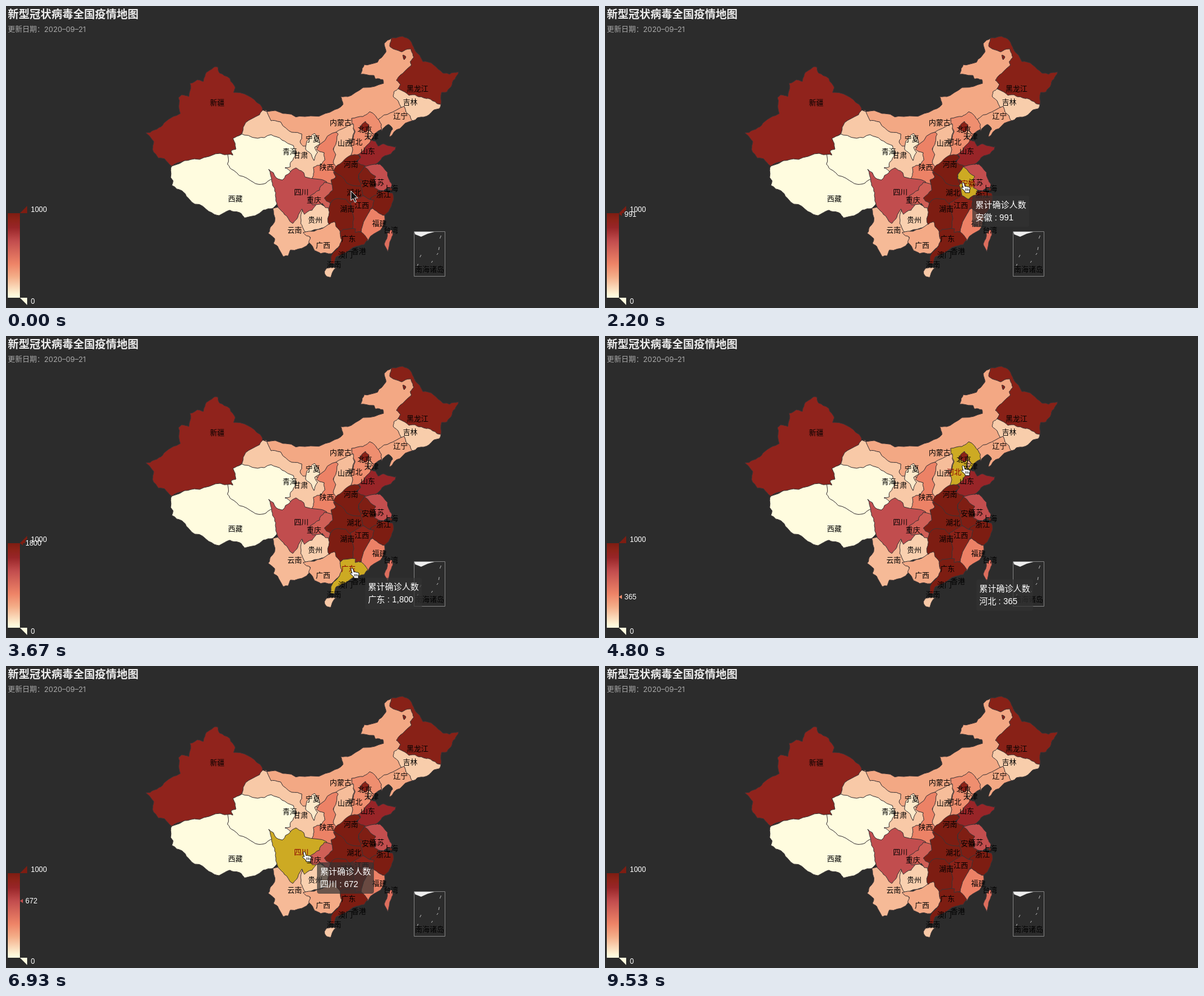
An HTML page that plays this animation: 980x500 px, repeating every 9.59 s.

```html
<!DOCTYPE html>
<html lang="zh-CN">
<head>
<meta charset="utf-8">
<title>疫情地图</title>
<style>
html, body { margin: 0; width: 100%; height: 100%; overflow: hidden; background: #2c2c2c; }
svg { position: absolute; left: 0; top: 0; }
text { font: 12px "Liberation Sans", "Noto Sans CJK SC", "Noto Sans CJK", sans-serif; }
#title { font: bold 18px "Noto Sans CJK SC", "Noto Sans CJK", sans-serif; fill: #eee; }
#date { font-family: Inter, "Noto Sans CJK SC", sans-serif; fill: #aaa; }
#map { stroke: #3a3335; stroke-width: 1; stroke-linejoin: round; }
#names { text-anchor: middle; fill: #000; }
#map .on { fill: #cdaa23; }
#names .on { fill: #8b0000; }
.legend { fill: #fff; }
#mark text { stroke: #2c2c2c; stroke-width: 3; paint-order: stroke; }
#tip {
  position: absolute; left: 0; top: 0; padding: 5px; border-radius: 4px;
  background: rgba(50, 50, 50, .7); color: #fff; white-space: pre;
  font: 500 14px/21px "Liberation Sans", "Noto Sans CJK SC", "Noto Sans CJK", sans-serif;
}
#tip div { height: 21px; }
</style>
</head>
<body>
<svg width="980" height="500" viewBox="0 0 980 500">
  <defs><linearGradient id="ramp" x1="0" y1="1" x2="0" y2="0"></linearGradient></defs>
  <text id="title" x="3" y="20">新型冠状病毒全国疫情地图</text>
  <text id="date" x="3" y="43">更新日期：2020–09–21</text>
  <g id="map"></g>
  <g fill="none" stroke="#808080">
    <path d="M674.5 373.500H725.500V447.500H674.500Z"/>
    <path stroke="#b5b5b5" d="M719 380l-2 5M716 399l-1 5M714 409l-2 3M686 412l-2 4M681 427l-1 3M705 422l-2 3"/>
    <path fill="#eee" stroke="none" d="M675 374H708L697 377 686 382 676 378Z"/>
  </g>
  <g id="names"></g>
  <rect x="3" y="343" width="20" height="140" fill="url(#ramp)"/>
  <path id="top" d="M23 343H35V331Z"/>
  <path id="low" d="M23 483H35V495Z"/>
  <g id="mark"><path d="M23 0l5-3.500v7Z"/><text class="legend" x="32" y="4.300"></text></g>
  <text class="legend" x="41" y="341">1000</text>
  <text class="legend" x="41" y="493">0</text>
</svg>
<div id="tip"><div>累计确诊人数</div><div id="info"></div></div>
<svg width="980" height="500" viewBox="0 0 980 500">
  <g id="cursor" stroke-linejoin="round">
    <path id="arrow" fill="#111" stroke="#fff" d="M0 0V16L3.700 12.800 6.500 19 9 18 6.400 11.800H11.300Z"/>
    <path id="hand" fill="#fff" stroke="#111" d="M-2 1.500Q0-1 1.500 2L3 7Q5 5.500 6.500 7.500Q8 6 9.500 8Q11.500 7.500 11.500 10L10.500 14V17H3V15L-3 9.500Q-3 7 0 9Z M4 10v4M6.500 10v4M9 10.500v3.500"/>
  </g>
</svg>
<script>
const LOOP = 9590, FPS = 15 / 1000;
const $ = id => document.getElementById(id);

// share of the scale, then red, green, blue
const stops = [
  [.02, 255, 252, 223], [.25, 244, 173, 136], [.4, 238, 132, 103], [.67, 194, 77, 78],
  [.83, 152, 37, 40], [.92, 142, 35, 25], [1, 125, 29, 18]
];

// name, value, label x, label y, key points; later regions overlap earlier ones
const regions = [
  ['西藏', 1, 379, 320, '274,265 272,284 276,289 274,297 291,306 298,315 312,328 335,340 352,347 370,338 386,342 394,351 425,338 441,335 460,320 450,285 375,235 310,250'],
  ['甘肃', 169, 487, 248, '424,172 390,190 380,225 460,285 510,295 530,265 530,235 500,205 460,185'],
  ['青海', 18, 469, 242, '370,215 390,212 416,219 438,213 456,222 475,231 480,243 471,258 470,266 461,268 472,276 457,293 440,286 430,293 416,295 398,285 376,272 366,262 366,240'],
  ['新疆', 902, 349, 161, '231,210 243,206 256,200 268,188 288,178 286,163 285,152 290,147 302,150 304,128 316,122 326,125 331,110 344,101 350,101 353,111 370,120 379,135 376,143 399,148 420,163 424,172 419,180 396,193 390,211 375,219 380,237 372,240 375,247 354,244 320,254 295,256 274,265 262,253 252,252 242,237 244,224'],
  ['内蒙古', 270, 553, 194, '424,172 445,173 462,178 494,183 535,176 557,163 553,150 565,150 590,135 624,128 623,122 611,121 608,115 586,113 592,97 614,93 628,76 625,62 637,53 676,72 674,90 660,125 670,165 640,190 600,205 560,225 530,240 510,232 491,232 486,225 489,212 472,209 454,192 438,190 431,173'],
  ['吉林', 157, 668, 160, '648,137 641,142 640,150 648,157 655,185 672,190 690,184 706,173 716,170 719,163 710,145 660,125'],
  ['黑龙江', 948, 680, 138, '637,53 655,50 668,57 675,72 689,92 706,97 722,111 733,113 748,109 742,121 736,133 729,142 720,143 719,163 705,157 690,152 676,147 666,148 648,137 652,130 645,123 652,114 670,98 668,92 674,85 669,71 654,76 640,71 634,66'],
  ['黑龙江', 948, 0, 0, '656,81 661,84 658,89'],
  ['辽宁', 270, 652, 183, '616,187 635,177 658,166 668,182 672,190 651,203 634,217 639,204 632,196 621,207 612,195'],
  ['河北', 365, 577, 226, '571,186 590,183 601,175 617,190 621,204 603,222 608,226 588,246 570,250 565,235 577,208 573,200'],
  ['山西', 203, 560, 228, '545,209 574,195 576,208 570,228 573,238 568,254 545,268 535,255 540,215'],
  ['陕西', 410, 530, 268, '545,209 549,212 541,236 545,246 541,260 549,272 545,283 538,296 505,288 509,275 508,267 521,262 527,255 526,243 513,237 520,228'],
  ['宁夏', 75, 507, 221, '510,211 516,219 518,229 510,234 515,242 509,256 502,243 495,237 497,224'],
  ['云南', 211, 477, 372, '441,335 460,330 490,335 500,380 505,390 497,397 470,404 466,414 458,415 449,398 442,393 444,385 433,376 437,366 444,357'],
  ['贵州', 147, 511, 355, '487,350 490,338 514,325 540,340 540,365 515,370 497,376 487,360'],
  ['四川', 672, 488, 309, '434,270 446,284 457,288 469,276 479,268 492,276 494,283 530,291 520,310 511,331 506,338 493,345 489,336 481,352 474,360 460,345 450,334 446,318 444,302 439,290'],
  ['重庆', 584, 509, 322, '526,292 545,296 535,335 528,334 523,327 506,329 501,322 503,314 518,305'],
  ['湖北', 68139, 575, 310, '541,275 590,285 595,318 570,330 536,326 526,318 540,305 537,288 545,284'],
  ['湖南', 1019, 564, 337, '536,326 543,320 562,320 573,330 580,355 575,372 562,378 547,375 532,358 533,337'],
  ['广西', 260, 524, 397, '491,375 515,370 532,362 543,357 546,366 552,373 558,386 549,400 538,410 520,410 510,405 500,391 503,383'],
  ['山东', 831, 598, 241, '603,222 611,224 615,232 624,228 645,233 643,238 626,248 609,263 598,270 578,262 586,250 582,246 594,233'],
  ['河南', 1276, 570, 263, '570,247 582,246 586,251 579,257 594,265 583,279 588,298 563,293 541,273 546,265 556,258'],
  ['浙江', 1282, 624, 313, '610,305 632,308 639,310 640,322 632,341 625,347 605,345 600,325'],
  ['福建', 415, 617, 361, '606,335 618,344 626,347 626,355 619,371 598,389 585,378 590,345'],
  ['江苏', 665, 613, 293, '592,266 609,262 618,262 624,268 633,287 638,296 636,301 624,306 605,303 595,285'],
  ['江西', 935, 588, 331, '569,326 590,314 601,320 608,321 606,332 595,350 587,374 577,377 573,369 575,352'],
  ['安徽', 991, 600, 295, '592,266 611,282 608,288 612,294 609,301 616,305 613,313 601,320 590,314 585,297 590,291 583,286 583,279'],
  ['广东', 1800, 566, 386, '552,375 557,370 578,369 577,375 587,374 598,387 592,395 573,400 546,415 543,427 536,425 537,415 549,400 555,387'],
  ['上海', 980, 636, 303, '630,303 637,301 638,307'],
  ['北京', 935, 593, 205, '594,191 600,197 599,204 594,209 584,203'],
  ['天津', 236, 604, 217, '600,204 605,210 598,221'],
  ['台湾', 509, 636, 372, '636,370 639,373 637,385 631,407 625,394 630,376'],
  ['海南', 171, 542, 429, '530,434 546,433 537,449 529,447 526,440'],
  ['香港', 0, 583, 407],
  ['澳门', 0, 561, 413]
];

// pointer rests: arrive, leave, x, y
const rests = [
  [0, 1850, 570, 306], [2120, 2600, 592, 292], [3500, 4300, 572, 384], [4600, 4745, 594, 385],
  [4790, 5500, 592, 214], [6500, 7100, 493, 307], [7700, 8300, 371, 190],
  [9000, 9050, 905, 470], [9350, LOOP, 905, 510]
];

const mix = (a, b, f) => a + (b - a) * f;

function shade(value) {
  const v = Math.min(1, Math.max(stops[0][0], value / 1000));
  const i = Math.max(1, stops.findIndex(s => s[0] >= v));
  const a = stops[i - 1], b = stops[i], f = (v - a[0]) / (b[0] - a[0]);
  return `rgb(${[1, 2, 3].map(c => Math.round(mix(a[c], b[c], f)))})`;
}

function add(parent, tag, attrs, text = '') {
  const el = document.createElementNS('http://www.w3.org/2000/svg', tag);
  for (const k in attrs) el.setAttribute(k, attrs[k]);
  el.textContent = text;
  return parent.appendChild(el);
}

// Bends every edge at its middle by a seeded amount
function roughen(pts) {
  const noise = n => { const s = Math.sin(n) * 43758.5; return s - Math.floor(s) - .5; };
  return pts.flatMap(([x, y], i) => {
    const [u, v] = pts[(i + 1) % pts.length], amp = Math.hypot(u - x, v - y) * .22;
    const sx = x + u, sy = y + v;
    return [[x, y], [sx / 2 + noise(sx * 1.3 + sy * 2.7) * amp, sy / 2 + noise(sx * 3.1 + sy * 1.9) * amp]];
  });
}

function outline(str) {
  const pts = str.split(' ').map(p => p.split(',').map(Number));
  return 'M' + roughen(roughen(pts)).map(p => p.map(n => n.toFixed(1)).join(' ')).join('L') + 'Z';
}

for (const [at, ...rgb] of stops) add($('ramp'), 'stop', { offset: at, 'stop-color': `rgb(${rgb})` });
$('top').setAttribute('fill', shade(1000));
$('low').setAttribute('fill', shade(0));

const areas = [];
for (const [name, value, x, y, pts] of regions) {
  const label = x && add($('names'), 'text', { x, y: y + 4.3 }, name);
  if (!pts) continue;
  const d = outline(pts);
  areas.push({ name, value, label, shape: new Path2D(d), path: add($('map'), 'path', { d, fill: shade(value) }) });
}
add($('names'), 'text', { x: 700, y: 441 }, '南海诸岛');

function pointer(t) {
  const i = Math.max(0, rests.findIndex(r => t < r[1]));
  const [arrive, , x, y] = rests[i];
  if (t >= arrive) return [x, y];
  const [, leave, x0, y0] = rests[i - 1];
  const f = (t - leave) / (arrive - leave), e = f * f * (3 - 2 * f);
  return [mix(x0, x, e), mix(y0, y, e)];
}

// The tooltip trails the pointer
function trail(t) {
  let x = 0, y = 0, sum = 0;
  for (let i = 0, w = 1; i < 10; i++, w *= .75) {
    const p = pointer(Math.max(0, t - 60 - 40 * i));
    x += p[0] * w; y += p[1] * w; sum += w;
  }
  return [x / sum + 21, y / sum + 18];
}

const probe = document.createElement('canvas').getContext('2d');
const areaAt = (x, y) => areas.filter(a => probe.isPointInPath(a.shape, x, y)).pop();

const show = (el, on) => { el.style.display = on ? '' : 'none'; };
const mark = $('mark'), [notch, reading] = mark.children;
let active = null;

function highlight(area) {
  if (area === active) return;
  active = area;
  for (const a of areas) {
    const on = !!area && a.name === area.name;
    a.path.classList.toggle('on', on);
    if (a.label) a.label.classList.toggle('on', on);
  }
  for (const el of [mark, $('tip'), $('hand')]) show(el, area);
  show($('arrow'), !area);
  if (!area) return;
  mark.setAttribute('transform', `translate(0 ${483 - 140 * Math.min(1, area.value / 1000)})`);
  notch.setAttribute('fill', shade(area.value));
  reading.textContent = area.value;
  $('info').textContent = `${area.name} : ${area.value.toLocaleString('en-US')}`;
}

const start = performance.now();
function draw() {
  const now = (performance.now() - start) % LOOP;
  const t = Math.floor((now + 5) * FPS) / FPS;
  const [x, y] = pointer(t), [tx, ty] = trail(t);
  highlight(t > 200 ? areaAt(x, y) : undefined);
  $('cursor').setAttribute('transform', `translate(${x} ${y})`);
  $('tip').style.transform = `translate(${tx}px, ${ty}px)`;
  requestAnimationFrame(draw);
}
draw();
</script>
</body>
</html>
```
